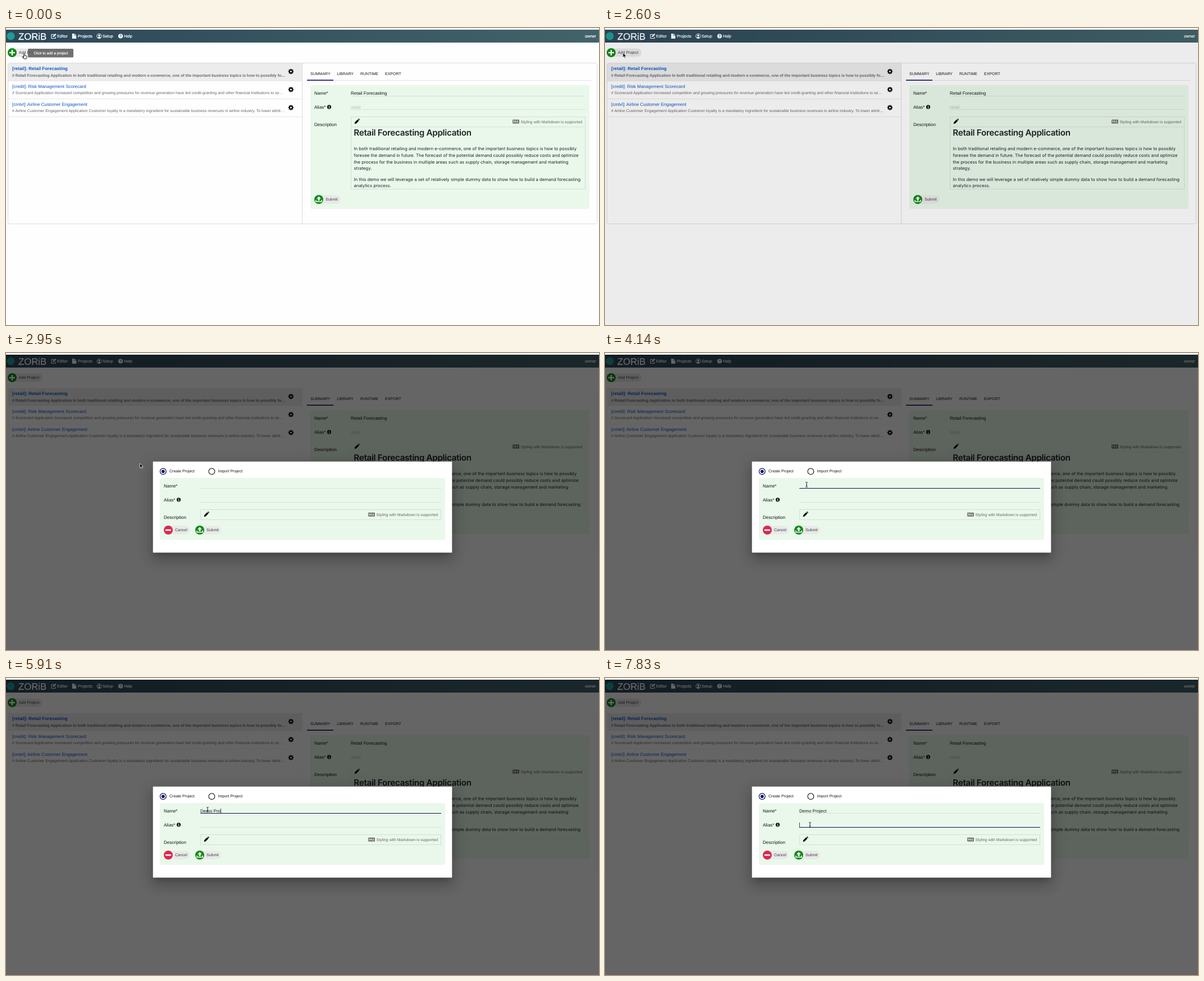
These frames come from a looping animation (1056x530 px, 8 s). An HTML page:

```html
<!DOCTYPE html>
<html lang="en">
<head>
<meta charset="utf-8">
<title>Add a project</title>
<style>
  html, body { margin: 0; width: 100%; height: 100%; overflow: hidden; background: #fff; }
  svg { display: block; width: 1056px; height: 530px; }
  text { font-family: "Liberation Sans", Arial, sans-serif; font-size: 8px; fill: #141414;
         white-space: pre; text-rendering: geometricPrecision; }
  .s { font-size: 7px; }
  .gray { fill: #666; }
  .link { fill: #0a55c8; }
  .bold { font-weight: 700; }
  .nav { font-size: 7.2px; fill: #fff; stroke: #fff; stroke-width: .22px; }
  .doc { font-family: Inter, sans-serif; font-size: 7.76px; fill: #1f2328; }
  .title { font-family: Inter, sans-serif; font-size: 15.2px; font-weight: 600;
           letter-spacing: -.02em; fill: #1f2328; }
  #page .edge { opacity: var(--edges); }
</style>
</head>
<body>
<svg id="stage" viewBox="0 0 1056 530" xmlns="http://www.w3.org/2000/svg"></svg>
<script>
const LOOP = 8000;
const GREEN = '#0b8a12', NAVY = '#0b0b5c', FORM = '#e9f8ea';

const text = (x, y, value, cls = '', extra = '') =>
  `<text x="${x}" y="${y}" class="${cls}" ${extra}>${value}</text>`;
const rect = (x, y, w, h, fill, extra = '') =>
  `<rect x="${x}" y="${y}" width="${w}" height="${h}" fill="${fill}" ${extra}/>`;
const circle = (x, y, r, fill, extra = '') =>
  `<circle cx="${x}" cy="${y}" r="${r}" fill="${fill}" ${extra}/>`;
const path = (d, extra = '') => `<path d="${d}" ${extra}/>`;
const at = (x, y, body) => `<g transform="translate(${x} ${y})">${body}</g>`;
const rule = (x, y, w, color = '#d6e2d7') => rect(x, y, w, 1, color, 'class="edge"');
const frame = (x, y, w, h, color = '#d3dfd4') =>
  rect(x, y, w, h, 'none', `stroke="${color}" class="edge"`);

const signs = {
  plus: path('M-5 0H5M0-5V5', 'stroke="#fff" stroke-width="2.4"'),
  minus: path('M-5 0H5', 'stroke="#fff" stroke-width="2.6"'),
  upload: path('M0-5.4L4-1.4H1.5V2H-1.5V-1.4H-4Z', 'fill="#fff"') +
          path('M-5 .8V3.8H5V.8', 'fill="none" stroke="#fff" stroke-width="1.6"')
};

// Round icon with a pill label to its right
const button = (x, y, sign, color, label, width) => at(x, y,
  rect(0, -7.5, width, 15, '#e9e9e9', 'rx="7.5"') +
  circle(0, 0, 8, color) + signs[sign] + text(12, 2.4, label, 's', 'fill-opacity=".8"'));

const pencil = (x, y) => at(x, y,
  path('M-4.4 4.4L-3.7 1.4L1.2-3.5L3.5-1.2L-1.4 3.7ZM1.9-4.2L2.7-4.8Q3.2-5 3.7-4.6L4.6-3.7Q5-3.2 4.7-2.7L4.1-1.9Z'));

const info = (x, y) => at(x, y, circle(0, 0, 3.6, '#111') +
  path('M-.9-.4H.4V2M-1 2H1.2M0-2.4V-1.2', 'stroke="#fff" stroke-width=".9" fill="none"'));

const markdownHint = (x, y) =>
  at(x, y, rect(0, 0, 12, 7, '#747474', 'rx="1"') +
    path('M2 5.3V1.9L3.7 3.8L5.4 1.9V5.3M8.7 1.6V4.2M7.2 3.6L8.7 5.2L10.2 3.6',
      'fill="none" stroke="#fff" stroke-width=".9"')) +
  text(x + 14.5, y + 6.3, 'Styling with Markdown is supported', 's gray');

const gear = (x, y) => {
  const teeth = Array.from({ length: 8 }, (_, i) =>
    rect(-1, -4.7, 2, 3, '#111', `transform="rotate(${i * 45})"`)).join('');
  return at(x, y, teeth + circle(0, 0, 2.6, 'none', 'stroke="#111" stroke-width="2"'));
};

const radio = (x, y, label, on) =>
  circle(x, y, 5.4, 'none', `stroke="${on ? NAVY : '#222'}" stroke-width="1.2"`) +
  (on ? circle(x, y, 2.9, NAVY) : '') + text(x + 11.2, y + 1.9, label, 's');

function header() {
  const white = 'fill="none" stroke="#fff" stroke-width="1.1"';
  return rect(0, 3, 1056, 23, 'url(#bar)') +
    circle(8.5, 14.5, 7, '#1f9c98') +
    text(22, 21, 'ZORiB', '', 'style="font-size:16.7px;fill:#fff;stroke:#fff;stroke-width:.3px"') +
    at(85, 14.5, path('M1-3H-4V4H3V1', white) +
      path('M-1.8 1.6L-1.3-.4L3-4.6L4.6-3L.3 1.2Z', 'fill="#fff"')) +
    text(91, 17, 'Editor', 'nav') +
    at(121.5, 14.5, path('M-3.7-4.6H0V-1H3.7V4.6H-3.7ZM.8-4.6L3.7-1.8H.8Z', 'fill="#fff"')) +
    text(128, 17, 'Projects', 'nav') +
    at(166, 14.5, circle(0, 0, 4.2, 'none', 'stroke="#fff"') + circle(0, -1, 1.8, '#fff') +
      path('M-3 2.7Q0-.2 3 2.7Q0 5.2-3 2.7', 'fill="#fff"')) +
    text(172, 17, 'Setup', 'nav') +
    at(204, 14.5, circle(0, 0, 4.1, '#fff') +
      text(0, 2.4, '?', 'bold', 'text-anchor="middle" style="font-size:6.8px;fill:#34505e"')) +
    text(210, 17, 'Help', 'nav') +
    text(1031, 17, 'owner', 'nav');
}

function projectList() {
  const projects = [
    ['[retail]: Retail Forecasting', '# Retail Forecasting Application In both traditional retailing and modern e-commerce, one of the important business topics is how to possibly fo…'],
    ['[credit]: Risk Management Scorecard', '# Scorecard Application Increased competition and growing pressures for revenue generation have led credit-granting and other financial institutions to se…'],
    ['[cmtvl]: Airline Customer Engagement', '# Airline Customer Engagement Application Customer loyalty is a mandatory ingredient for sustainable business revenues in airline industry. To lower attriti…']
  ];
  return rect(3.5, 62.5, 1049, 287, 'none', 'stroke="#dcdcdc" rx="3" class="edge"') +
    rect(4, 63, 523, 31, '#ececec') +
    rect(527, 63, 1, 286, '#dcdcdc', 'class="edge"') +
    projects.map(([name, summary], i) => {
      const y = i * 31.9, weight = i ? '' : ' bold';
      return text(11, 75 + y, name, 'link' + weight) +
        text(11, 86.5 + y, summary, 's gray' + weight) +
        gear(507.4, 77.6 + i * 32.2) + rule(4, Math.round(94 + y), 523, '#e6e6e6');
    }).join('');
}

function details() {
  const tabs = [[542, 'SUMMARY'], [589.2, 'LIBRARY'], [631, 'RUNTIME'], [675, 'EXPORT']];
  const lines = [
    [218.2, 'In both traditional retailing and modern e-commerce, one of the important business topics is how to possibly'],
    [229.9, 'foresee the demand in future. The forecast of the potential demand could possibly reduce costs and optimize'],
    [241.7, 'the process for the business in multiple areas such as supply chain, storage management and marketing'],
    [253.4, 'strategy.'],
    [272.6, 'In this demo we will leverage a set of relatively simple dummy data to show how to build a demand forecasting'],
    [284.4, 'analytics process.']
  ];
  return tabs.map(([x, label]) => text(x, 83.6, label, 's')).join('') +
    rule(536, 93, 507, '#e2e2e2') + rect(536, 92.4, 47, 1.6, NAVY) +
    rect(542, 102, 497, 221, FORM, 'rx="3"') +
    text(549, 119.2, 'Name*') + text(614, 119.2, 'Retail Forecasting') + rule(614, 121, 418) +
    text(549, 143.6, 'Alias*') + info(575.5, 140.9) +
    text(614, 143.6, 'retail', '', 'style="fill:#b4beb5"') + rule(614, 145, 418) +
    text(549, 174.6, 'Description') + frame(614.5, 158.5, 417, 129) + rule(615, 176, 416) +
    pencil(625, 166.7) + markdownHint(902, 163.4) +
    text(619.3, 192.4, 'Retail Forecasting Application', 'title') +
    lines.map(([y, line]) => text(619.5, y, line, 'doc')).join('') +
    button(557, 306, 'upload', GREEN, 'Submit', 39);
}

// Shadow of the dialog panel, with the offset, blur and spread of a CSS box-shadow
const shadow = (drop, blur, spread, alpha) =>
  rect(262 - spread, 194 - spread + drop, 532 + 2 * spread, 162 + 2 * spread, '#000',
    `opacity="${alpha}" style="filter:blur(${blur / 2}px)"`);

function dialog() {
  return shadow(6.3, 8.6, -4, .2) + shadow(13.7, 21.7, 1.7, .14) + shadow(5.1, 26.3, 4.6, .12) +
    rect(261.7, 193.7, 532.6, 162.6, '#fff', 'rx="1"') +
    radio(279.8, 211.3, 'Create Project', true) + radio(366.4, 211.3, 'Import Project', false) +
    rect(274, 223, 508, 110.5, FORM, 'rx="3"') +
    text(281, 240.2, 'Name*') + rule(346, 241, 429) +
    text(281, 264.9, 'Alias*') + info(307.5, 261.8) + rule(346, 266, 429) +
    text(281, 296, 'Description') + frame(346.5, 279.5, 428, 18) +
    pencil(357, 287.8) + markdownHint(645, 284.8) +
    button(289, 316, 'minus', '#dc2850', 'Cancel', 38) +
    button(345, 316, 'upload', GREEN, 'Submit', 38) +
    rect(0, 0, 429, 1, NAVY, 'id="focus"') +
    text(346, 240.2, '', '', 'id="typed" xml:space="preserve"') +
    rect(0, 0, .8, 8, '#111', 'id="caret"');
}

const pointers = {
  arrow: path('M0 0V8L1.9 6.3L3.2 9.2L4.7 8.5L3.4 5.7H6Z', 'fill="#000" stroke="#fff" stroke-width=".7"'),
  hand: path('M-1.4 3V-3.5Q-.6-4.8.2-3.5V-.8L3.4 0Q4.4.4 4.2 1.6L3.4 5H-1.4L-4 1.4Q-3.6.2-2.4 1Z',
    'fill="#fff" stroke="#000" stroke-width=".9"'),
  beam: path('M-1.8-4.4Q0-4.4 0-3.2Q0-4.4 1.8-4.4M0-3.4V3.4M-1.8 4.4Q0 4.4 0 3.2Q0 4.4 1.8 4.4M-1 1.3H1',
    'fill="none" stroke="#111" stroke-width=".9"')
};

const stage = document.getElementById('stage');
stage.innerHTML =
  `<defs><linearGradient id="bar"><stop stop-color="#2d4759"/><stop offset="1" stop-color="#42636a"/></linearGradient></defs>` +
  `<g id="page">${rect(0, 0, 1056, 530, '#fefefe') + header() +
    button(11, 44, 'plus', GREEN, 'Add Project', 54) +
    '<ellipse id="ripple" cx="40" cy="46" rx="14" ry="6"/>' +
    projectList() + details()}</g>` +
  rect(0, 3, 1056, 527, '#000', 'id="dim"') +
  `<g id="dialog">${dialog()}</g>` +
  `<g id="tip">${rect(39, 37, 81, 15.5, '#616161', 'rx="1.5" opacity=".9"')}${
    text(49.3, 47, 'Click to add a project', '', 'style="font-size:6.55px;fill:#fff;stroke:#fff;stroke-width:.18px"')}</g>` +
  Object.entries(pointers).map(([name, art]) => `<g id="${name}">${art}</g>`).join('');

const el = Object.fromEntries([...stage.querySelectorAll('[id]')].map(node => [node.id, node]));

// Each step lists only what changes at its time
const steps = [
  [0, { tip: 1, ripple: 0, dim: 0, edges: 1, dialog: 0, lift: 0, pointer: ['hand', 33, 50], typed: '', caret: 0, row: 0, grow: 0 }],
  [140, { tip: 0 }],
  [2600, { dim: .07, pointer: ['arrow', 32, 44.5] }],
  [2750, { dim: .48, edges: .2, dialog: .62, lift: -5.7, ripple: 1 }],
  [2950, { dim: .6, dialog: 1, lift: 0, ripple: 0, pointer: ['arrow', 238.3, 197] }],
  [3160, { pointer: ['arrow', 318, 228] }],
  [3350, { pointer: ['beam', 352, 236] }],
  [3540, { pointer: ['beam', 359, 235] }],
  [3690, { caret: 1, grow: .7 }],
  [3840, { grow: 1 }],
  [4140, { caret: 0 }],
  [4430, { typed: 'D', caret: 1 }],
  [4880, { typed: 'De' }],
  [5030, { typed: 'Dem' }],
  [5180, { typed: 'Demo' }],
  [5470, { typed: 'Demo ' }],
  [5770, { typed: 'Demo P' }],
  [5910, { typed: 'Demo Pro' }],
  [6210, { typed: 'Demo Proj' }],
  [6360, { typed: 'Demo Proje' }],
  [6510, { typed: 'Demo Project' }],
  [6810, { pointer: ['beam', 360, 239] }],
  [6960, { pointer: ['beam', 363, 250] }],
  [7110, { pointer: ['beam', 365, 259] }],
  [7260, { pointer: ['beam', 365, 262], caret: 0 }],
  [7400, { row: 1, grow: .35, caret: 1 }],
  [7550, { grow: .9 }],
  [7690, { grow: 1 }]
];

function render(state) {
  for (const id of ['tip', 'dim', 'dialog', 'caret']) el[id].setAttribute('opacity', state[id]);
  el.ripple.setAttribute('opacity', state.ripple * .14);
  el.page.style.setProperty('--edges', state.edges);
  el.dialog.setAttribute('transform', `translate(0 ${state.lift})`);

  const top = state.row * 25;
  el.focus.setAttribute('transform', `translate(${346 + 214.5 * (1 - state.grow)} ${241 + top}) scale(${state.grow} 1)`);
  el.typed.textContent = state.typed;
  const end = state.row || !state.typed ? 0 : el.typed.getComputedTextLength();
  el.caret.setAttribute('transform', `translate(${346.2 + end} ${233 + top})`);

  const [shape, x, y] = state.pointer;
  for (const name in pointers) el[name].setAttribute('visibility', name === shape ? 'visible' : 'hidden');
  el[shape].setAttribute('transform', `translate(${x} ${y})`);
}

const start = performance.now();
let shown = 0;
function tick() {
  const time = Math.max(0, performance.now() - start) % LOOP;
  const past = steps.filter(([from]) => from <= time);
  if (past.length !== shown) {
    shown = past.length;
    render(Object.assign({}, ...past.map(([, change]) => change)));
  }
  requestAnimationFrame(tick);
}
tick();
</script>
</body>
</html>
```
